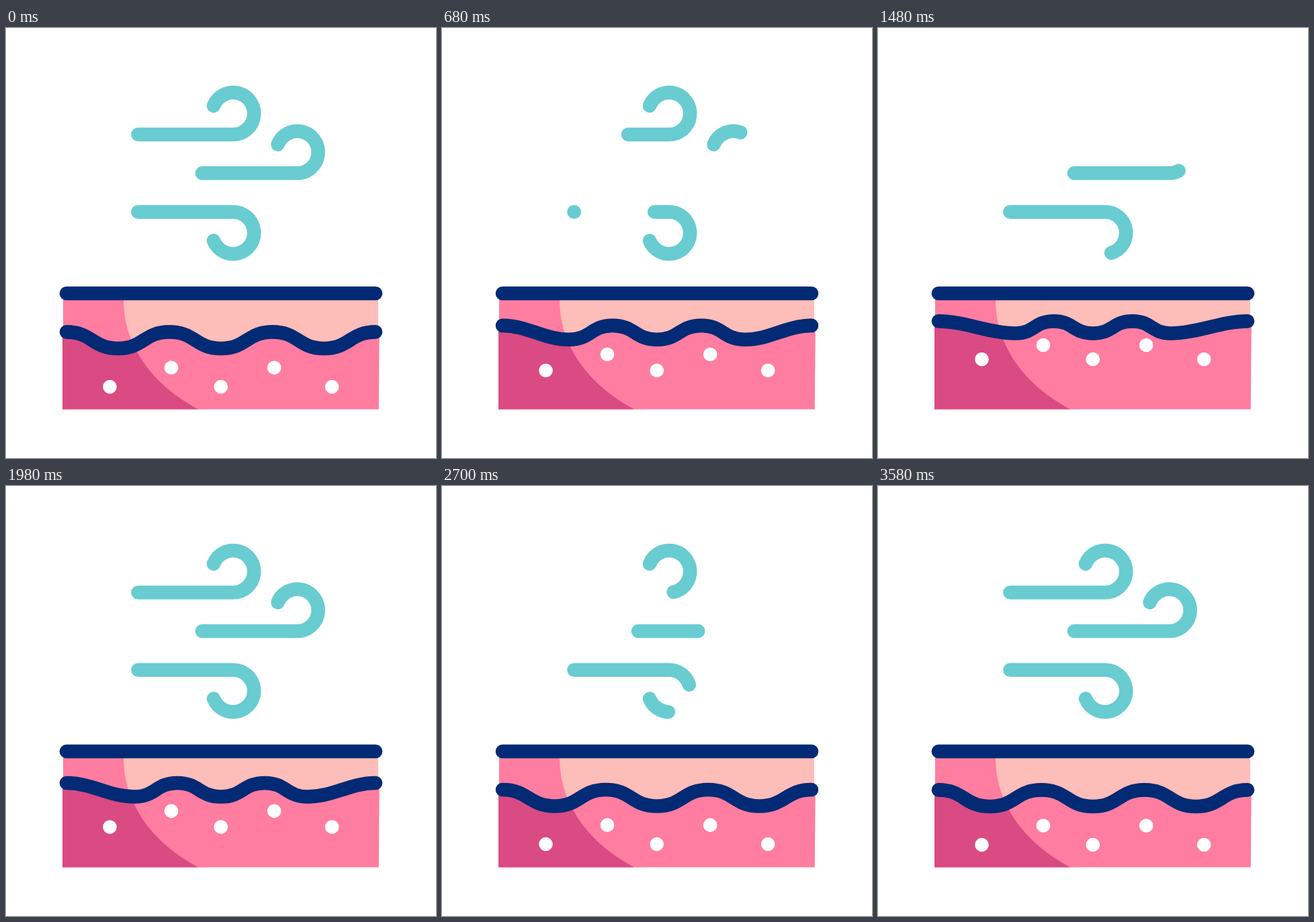
Write an HTML page that moves like this. It is 640 px wide and 640 px high and loops after 3.6 s.

```html
<!DOCTYPE html>
<html lang="en">
<head>
<meta charset="utf-8">
<title>Skin and wind</title>
<style>
  html, body { margin: 0; width: 100%; height: 100%; overflow: hidden; background: #fff; }
  svg { display: block; width: 100vw; height: 100vh; }
  .stroke { fill: none; stroke-width: 20.6; stroke-linecap: round; }
  .navy { stroke: #032a74; }
  .wind { stroke: #68ccd1; }
</style>
</head>
<body>
<svg viewBox="0 0 640 640">
  <defs>
    <clipPath id="under"><path id="underShape"/></clipPath>
  </defs>
  <path fill="#ff7da0" d="M85 395H300V480H85Z"/>
  <path fill="#fdbdb9" d="M175 395V405C175 470 215 530 286 567.5H300V480H554V395Z"/>
  <g clip-path="url(#under)">
    <path fill="#ff7da0" d="M84 420H556L554.8 567.5H84Z"/>
    <path fill="#da4a83" d="M84 395H175V405C175 470 215 530 286 567.5H84Z"/>
  </g>
  <g id="dots" fill="#fff"></g>
  <path class="stroke navy" d="M90 395H550"/>
  <path class="stroke navy" id="wave"/>
  <g id="winds"></g>
</svg>
<script>
const LOOP = 3600, SECOND_PASS = 1990;
const $ = id => document.getElementById(id);
const clamp = x => Math.min(1, Math.max(0, x));
const span = (t, [from, to]) => clamp((t - from) / (to - from));
const smooth = x => x * x * (3 - 2 * x);
const mix = (a, b, k) => a + (b - a) * k;

function add(parent, tag, attrs) {
  const el = document.createElementNS('http://www.w3.org/2000/svg', tag);
  for (const name in attrs) el.setAttribute(name, attrs[name]);
  return parent.appendChild(el);
}

// Each gust is wiped out and redrawn twice; times in ms.
const gusts = [
  { d: 'M196.5 158.5H338A31.2 31.2 0 1 0 309 115.8',
    wipe: [[397, 1373], [2178, 3154]], draw: [[1490, 1970], [3250, 3575]] },
  { d: 'M292 216H433.5A31.2 31.2 0 1 0 404.5 173.3',
    wipe: [[88, 808], [2000, 2680]], draw: [[1002, 1851], [2317, 3508]] },
  { d: 'M196.5 273.8H338A31.2 31.2 0 1 1 309 316.5',
    wipe: [[373, 1085], [2084, 2795]], draw: [[680, 1645], [2150, 3491]], easeOut: true }
];
for (const g of gusts) {
  const attrs = { class: 'stroke wind', d: g.d };
  g.tail = add($('winds'), 'path', attrs);
  g.head = add($('winds'), 'path', attrs);
  g.length = g.tail.getTotalLength();
}

const dots = [154.5, 246, 319.8, 399.2, 485.2].map((x, i) => {
  const high = i % 2;
  return {
    el: add($('dots'), 'circle', { cx: x, r: 10.3 }),
    low: high ? 505.5 : 534,
    top: high ? 471.7 : 492.6
  };
});

function trim(path, from, to, length) {
  path.style.display = to > from ? '' : 'none';
  path.style.strokeDasharray = `${(to - from) * length} ${length * 3}`;
  path.style.strokeDashoffset = -from * length;
}

function drawGust(g, t) {
  const pass = t < SECOND_PASS ? 0 : 1;
  const gone = span(t, g.wipe[pass]);
  let grown = span(t, g.draw[pass]);
  if (g.easeOut && pass) grown = 1 - (1 - grown) ** 2;
  trim(g.tail, gone, 1, g.length);
  trim(g.head, 0, grown, g.length);
}

function drawSkin(t) {
  const k = smooth(span(t, [90, 1150])) - smooth(span(t, [1400, 2835]));
  const crest = mix(452.4, 436.2, k), trough = mix(477, 454.3, k);
  const x1 = mix(166.7, 205, k), x2 = mix(243.3, 261.3, k);
  const xs = [90, x1, x2, 320, 640 - x2, 640 - x1, 550];
  let curve = '';
  for (let i = 1; i < xs.length; i++) {
    const h = i === 1 || i === 6 ? 38 : (xs[i] - xs[i - 1]) / 2;
    const [y0, y1] = i % 2 ? [crest, trough] : [trough, crest];
    curve += `C${xs[i - 1] + h} ${y0} ${xs[i] - h} ${y1} ${xs[i]} ${y1}`;
  }
  $('wave').setAttribute('d', `M90 ${crest}${curve}`);
  $('underShape').setAttribute('d', `M84 ${crest}H90${curve}H556V568H84Z`);
  for (const dot of dots) dot.el.setAttribute('cy', mix(dot.low, dot.top, k));
}

const start = performance.now();
function frame() {
  const t = (performance.now() - start) % LOOP;
  drawSkin(t);
  for (const g of gusts) drawGust(g, t);
  requestAnimationFrame(frame);
}
frame();
</script>
</body>
</html>
```
